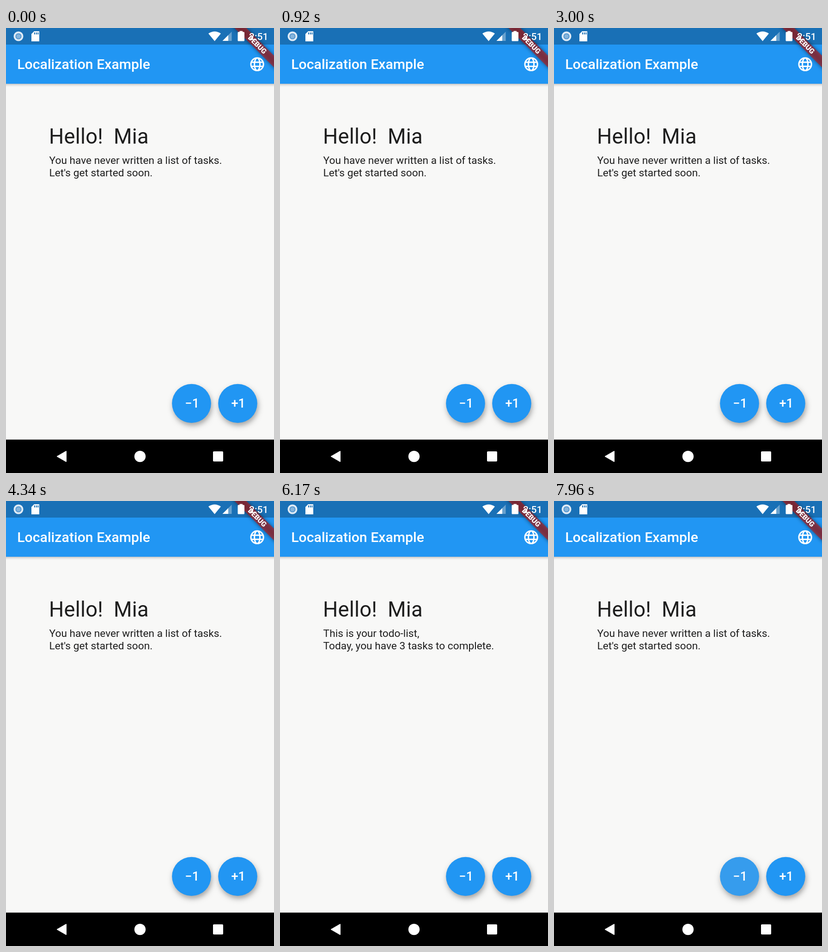
An HTML page with a canvas for the animation above (8 s loop, 580 px wide and 966 px high).

```html
<!DOCTYPE html>
<html lang="en">
<head>
<meta charset="utf-8">
<title>Localization Example</title>
<style>
  html, body { margin: 0; width: 100%; height: 100%; overflow: hidden; background: #000; }
  canvas { display: block; width: 580px; height: 966px; }
</style>
</head>
<body>
<canvas id="stage" width="580" height="966"></canvas>
<script>
const ctx = document.getElementById('stage').getContext('2d');
const LOOP = 8000;
const FADE = 200;
const BLUE = '#2196f3';
const STATUS = '#1970b6';

// Each tap: pressed at `down`, released (and counted) at `up`.
const taps = [
  { down: 4340, up: 4600, step: 1 },
  { down: 5040, up: 5160, step: 1 },
  { down: 5670, up: 5785, step: 1 },
  { down: 6420, up: 6730, step: -1 },
  { down: 7130, up: 7245, step: -1 },
  { down: 7710, up: 7825, step: -1 }
];

const clamp = v => Math.max(0, Math.min(1, v));

function pressAmount(t, step) {
  return taps.filter(tap => tap.step === step).reduce((most, { down, up }) =>
    Math.max(most, Math.min(clamp((t - down) / 110), clamp((up + FADE - t) / FADE))), 0);
}

function taskCount(t) {
  return taps.reduce((n, tap) => t >= tap.up ? n + tap.step : n, 0);
}

function message(n) {
  return n === 0
    ? ['You have never written a list of tasks.', "Let's get started soon."]
    : ['This is your todo-list,', `Today, you have ${n} ${n === 1 ? 'task' : 'tasks'} to complete.`];
}

function text(str, x, y, size, { weight = 400, color = '#fff', align = 'left', spacing = 0 } = {}) {
  ctx.font = `${weight} ${size}px Roboto, sans-serif`;
  ctx.letterSpacing = spacing + 'px';
  ctx.textAlign = align;
  ctx.fillStyle = color;
  ctx.fillText(str, x, y);
}

function rect(x, y, w, h, color) {
  ctx.fillStyle = color;
  ctx.fillRect(x, y, w, h);
}

function circle(x, y, r, color) {
  ctx.fillStyle = color;
  ctx.beginPath();
  ctx.arc(x, y, r, 0, Math.PI * 2);
  ctx.fill();
}

function polygon(points, color) {
  ctx.fillStyle = color;
  ctx.beginPath();
  points.forEach(([x, y]) => ctx.lineTo(x, y));
  ctx.closePath();
  ctx.fill();
}

function roundRect(x, y, w, h, r, color) {
  ctx.fillStyle = color;
  ctx.beginPath();
  ctx.roundRect(x, y, w, h, r);
  ctx.fill();
}

function drawStatusIcons() {
  circle(27, 18, 10.5, '#dfebf6');
  circle(27, 18, 6.6, '#5697ce');
  circle(27, 18, 4.6, '#86b5dc');

  polygon([[61, 7], [72, 7], [72, 29], [55, 29], [55, 13]], '#fff');
  for (const x of [61, 64.8, 68.4]) rect(x, 9.5, 2, 4.5, STATUS);

  ctx.fillStyle = '#fff';
  ctx.beginPath();
  ctx.moveTo(451.5, 28.5);
  ctx.lineTo(438, 12);
  ctx.quadraticCurveTo(451.5, 3, 465, 12);
  ctx.fill();

  polygon([[468.5, 28], [488.5, 28], [488.5, 8]], 'rgba(255,255,255,.35)');
  polygon([[468.5, 28], [481, 28], [481, 15.5]], '#fff');

  roundRect(501.5, 8.5, 14.5, 20, 1.5, '#fff');
  rect(505.5, 6.5, 6.5, 3, '#fff');
  text('2:51', 526, 26, 21, { weight: 500 });
}

function drawGlobe() {
  ctx.save();
  ctx.translate(543.6, 78.7);
  ctx.strokeStyle = '#fff';
  ctx.lineWidth = 3;
  ctx.beginPath();
  ctx.arc(0, 0, 13.6, 0, Math.PI * 2);
  ctx.moveTo(6, 0);
  ctx.ellipse(0, 0, 6, 13.6, 0, 0, Math.PI * 2);
  for (const y of [-4.5, 4.5]) {
    ctx.moveTo(-12.6, y);
    ctx.lineTo(12.6, y);
  }
  ctx.stroke();
  ctx.restore();
}

function drawAppBar() {
  const shade = ctx.createLinearGradient(0, 121, 0, 128);
  shade.addColorStop(0, 'rgba(0,0,0,.21)');
  shade.addColorStop(.4, 'rgba(0,0,0,.09)');
  shade.addColorStop(1, 'rgba(0,0,0,0)');
  rect(0, 121, 580, 7, shade);
  rect(0, 0, 580, 36, STATUS);
  rect(0, 36, 580, 85, BLUE);
  text('Localization Example', 24.2, 89.3, 30.2, { weight: 500 });
  drawGlobe();
}

function drawBanner() {
  ctx.save();
  ctx.translate(580, 0);
  ctx.rotate(Math.PI / 4);
  // Only the shadow of this off-screen strip lands on the stage.
  ctx.shadowColor = 'rgba(0,0,0,.5)';
  ctx.shadowBlur = 9;
  ctx.shadowOffsetX = 2000;
  ctx.translate(-2000 * Math.SQRT1_2, 2000 * Math.SQRT1_2);
  rect(-90, 42.4, 180, 18, '#000');
  ctx.translate(2000 * Math.SQRT1_2, -2000 * Math.SQRT1_2);
  ctx.shadowColor = 'transparent';
  rect(-90, 42.4, 180, 18, 'rgba(183,28,28,.627)');
  text('DEBUG', 0, 56.2, 15.4, { weight: 900, align: 'center' });
  ctx.restore();
}

function drawButton(x, label, press) {
  const lift = press * press;
  ctx.save();
  ctx.shadowColor = 'rgba(0,0,0,.34)';
  ctx.shadowBlur = 12 + 10 * lift;
  ctx.shadowOffsetX = 2 + 4 * lift;
  ctx.shadowOffsetY = 6 + 6 * lift;
  circle(x, 815, 42.3, BLUE);
  ctx.restore();
  circle(x, 815, 42.3, `rgba(190,190,190,${.41 * press})`);
  text(label, x + 1.2, 824.3, 27.2, { weight: 500, align: 'center' });
}

function drawNavBar() {
  rect(0, 893.5, 580, 73, '#000');
  ctx.lineJoin = 'round';
  ctx.strokeStyle = '#fff';
  ctx.lineWidth = 2;
  polygon([[111, 930], [130, 919], [130, 941]], '#fff');
  ctx.stroke();
  circle(290, 930, 12.2, '#fff');
  roundRect(448, 919, 22, 22, 2, '#fff');
}

function draw(t) {
  const ink = '#1e1e1e';
  rect(0, 0, 580, 966, '#f8f8f7');
  drawAppBar();
  drawBanner();
  drawStatusIcons();

  text('Hello!  Mia', 93, 251, 45.3, { color: ink, spacing: .2 });
  message(taskCount(t)).forEach((line, i) =>
    text(line, 93.6, 294.5 + 27 * i, 22.7, { color: ink }));

  drawButton(401.5, '\u22121', pressAmount(t, -1));
  drawButton(501.5, '+1', pressAmount(t, 1));
  drawNavBar();
}

const start = performance.now();
function tick() {
  draw((performance.now() - start) % LOOP);
  requestAnimationFrame(tick);
}
tick();
</script>
</body>
</html>
```
